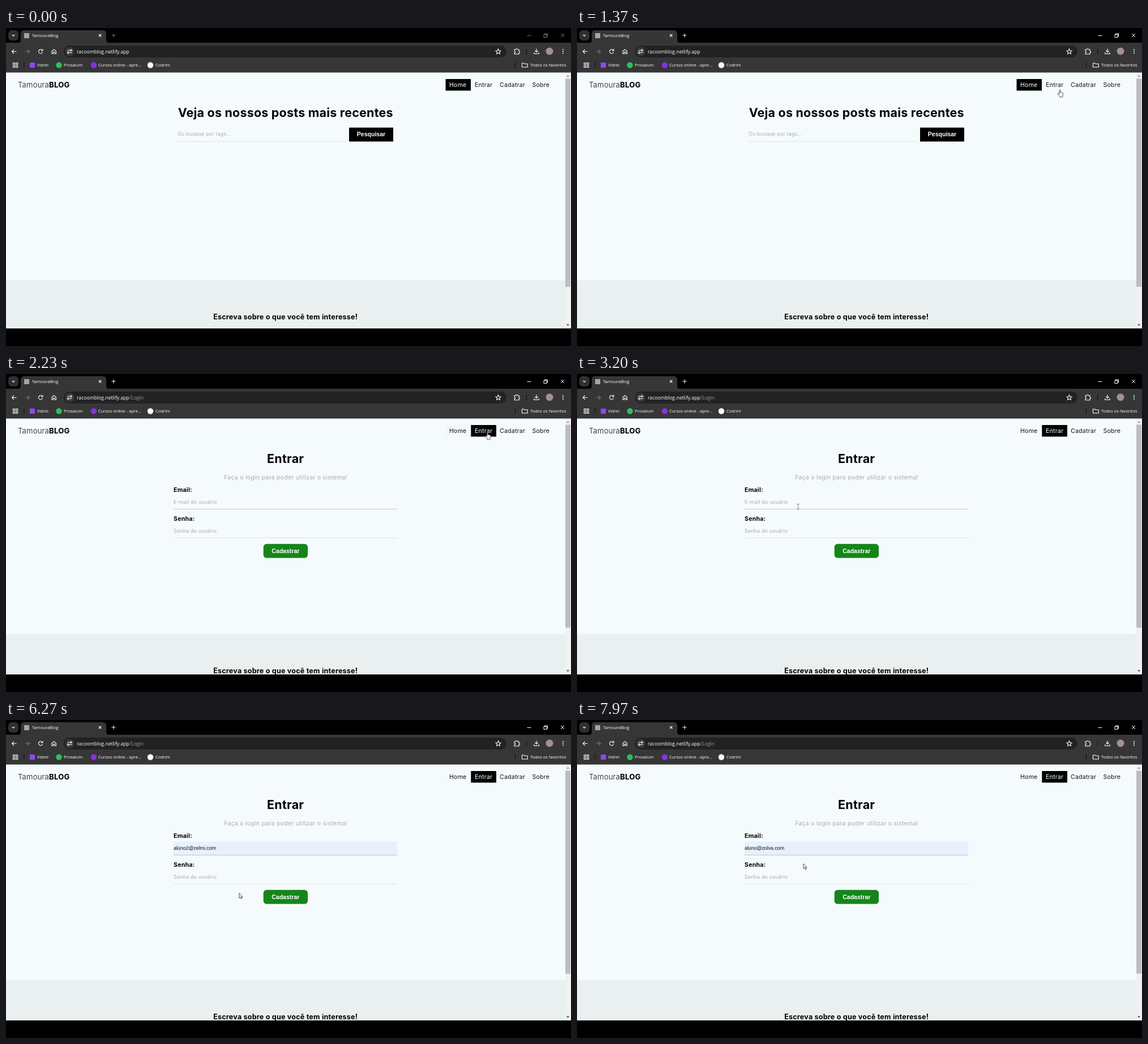
An HTML page for the animation above (8 s loop, 998 px wide and 561 px high).

```html
<!DOCTYPE html>
<html lang="pt-BR">
<head>
<meta charset="utf-8">
<title>TamouraBlog</title>
<style>
html, body { margin: 0; width: 100%; height: 100%; overflow: hidden; background: #000; }
svg { display: block; width: 998px; height: 561px; }

.ui { font: 7.5px "Open Sans", "Noto Sans", sans-serif; fill: #fff; }
.url { font-size: 8.64px; }
.path { fill: #9b9b9b; }
.site { font: 400 10.56px Inter, sans-serif; letter-spacing: .022em; }
.site text { fill: #111; }
.site .title { font-size: 21.45px; font-weight: 700; fill: #000; }
.site .bold { font-weight: 700; fill: #000; }
.site .logo { font-size: 13.1px; }
.site .light { font-weight: 300; }
.site .black { font-weight: 800; }
.site .call { font-size: 12.5px; }
.site .soft { fill: #a9abac; }
.site .hint { font-size: 8.8px; fill: #a9abac; }
.site .button { font: 700 10.56px "Liberation Sans", Arial, sans-serif; letter-spacing: 0; fill: #fff; }
.site .typed { font: 8.8px "Liberation Sans", Arial, sans-serif; letter-spacing: 0; }
.mid { text-anchor: middle; }
.line { fill: none; stroke: #fff; stroke-width: 1.1; }
.dim { stroke: #777; }

/* Every animation shares one 8 s clock; 1% is 80 ms. */
.anim, .step { animation: 8s linear infinite; }
.step { animation-timing-function: step-end; }

#controls { animation-name: focus; }
@keyframes focus { 0% { stroke: #777 } 7.5%, 100% { stroke: #fff } }

.before { animation-name: before; }
.after { animation-name: after; }
@keyframes before { 0% { opacity: 1 } 23.375%, 100% { opacity: 0 } }
@keyframes after { 0% { opacity: 0 } 23.375%, 100% { opacity: 1 } }

#footer { animation-name: footer; }
@keyframes footer { 0% { transform: none } 23.375%, 100% { transform: translateY(14px) } }
#thumb { animation-name: thumb; }
@keyframes thumb { 0% { height: 367px } 23.375%, 100% { height: 358px } }

#homeBox { animation-name: boxOff; }
#enterBox { animation-name: boxOn; }
#homeText { animation-name: textOff; }
#enterText { animation-name: textOn; }
@keyframes boxOff {
  0% { opacity: 1 }
  23.5% { opacity: 1; animation-timing-function: ease }
  28.5%, 100% { opacity: 0 }
}
@keyframes boxOn {
  0% { opacity: 0 }
  23.5% { opacity: 0; animation-timing-function: ease }
  28.5%, 100% { opacity: 1 }
}
@keyframes textOff {
  0% { fill: #fff }
  23.5% { fill: #fff; animation-timing-function: ease }
  28.5%, 100% { fill: #111 }
}
@keyframes textOn {
  0% { fill: #111 }
  23.5% { fill: #111; animation-timing-function: ease }
  26%, 100% { fill: #fff }
}

#caret { animation-name: caret; }
@keyframes caret { 0%, 51.25%, 58.75%, 100% { opacity: 0 } 44.625%, 57.875% { opacity: 1 } }
#filled { animation-name: filled; }
@keyframes filled { 0% { opacity: 0 } 58.75%, 100% { opacity: 1 } }
#mailA { animation-name: mailA; }
#mailB { animation-name: mailB; }
@keyframes mailA { 0%, 81.25%, 92.5%, 100% { opacity: 1 } 71.5%, 84.5% { opacity: 0 } }
@keyframes mailB { 0%, 81.25%, 92.5%, 100% { opacity: 0 } 71.5%, 84.5% { opacity: 1 } }

#pointer { animation-name: move; }
@keyframes move {
  0%, 3.125% { transform: translate(770px, 538px) }
  8.75% { transform: translate(820px, 300px) }
  13.75% { transform: translate(850px, 120px) }
  17.125% { transform: translate(853px, 109px) }
  21.25% { transform: translate(852px, 104px) }
  23.75%, 31.625% { transform: translate(850.5px, 102.5px) }
  33.5% { transform: translate(640px, 170px) }
  35.375%, 37.125% { transform: translate(403px, 233px) }
  40%, 48.375% { transform: translate(390.5px, 234px) }
  58.125% { transform: translate(402px, 250px) }
  58.75% { transform: translate(403px, 254px) }
  68.375%, 70% { transform: translate(405px, 262px) }
  72.5% { transform: translate(409px, 300px) }
  75%, 77.5% { transform: translate(412px, 309px) }
  78.375% { transform: translate(412px, 305.5px) }
  81.25% { transform: translate(409px, 268px) }
  85.625% { transform: translate(404px, 312px) }
  88.375%, 91.25% { transform: translate(400px, 317px) }
  95% { transform: translate(400px, 262px) }
  97.875%, 100% { transform: translate(400px, 253.5px) }
}
#arrow { animation-name: arrow; }
#hand { animation-name: hand; }
#beam { animation-name: beam; }
@keyframes arrow { 0%, 32%, 50.625%, 100% { opacity: 1 } 16.25%, 34.875% { opacity: 0 } }
@keyframes hand { 0%, 32%, 100% { opacity: 0 } 16.25% { opacity: 1 } }
@keyframes beam { 0%, 50.625%, 100% { opacity: 0 } 34.875% { opacity: 1 } }
</style>
</head>
<body>
<svg viewBox="0 0 998 561">
  <defs><clipPath id="window"><rect width="998" height="530"/></clipPath></defs>
  <rect width="998" height="561"/>

  <!-- Browser frame -->
  <g class="ui">
    <rect y="26" width="998" height="52.5" fill="#363636"/>
    <rect x="4" y="4" width="18" height="18" rx="6" fill="#303030"/>
    <path d="M22 26q4 0 4-5V10q0-6 6-6h139q6 0 6 6v11q0 5 4 5z" fill="#363636"/>
    <rect x="32" y="9" width="9" height="9" fill="#a5a5a5"/>
    <text x="46" y="16">TamouraBlog</text>
    <path class="line" d="M10.8 12l2.2 2.2 2.2-2.2M164 11l4.4 4.4m0-4.4l-4.4 4.4"/>
    <g id="controls" class="step" fill="none">
      <path d="M186.5 13h7m-3.5-3.5v7M920.5 13.5h7M980 10l6 6m0-6l-6 6"/>
      <path d="M950 11.5h5v5h-5zM951.5 11.5V10h5v5H955"/>
    </g>

    <rect x="102" y="31" width="782" height="21" rx="10.5" fill="#212224"/>
    <circle cx="112.5" cy="41.5" r="8" fill="#3a3a3a"/>
    <path class="line dim" d="M33.5 41.5h8m-3.5-3.5l3.5 3.5-3.5 3.5"/>
    <g class="line">
      <path d="M18.5 41.5h-8m3.5-3.5l-3.5 3.5 3.5 3.5"/>
      <path d="M64.3 39.5a3.6 3.6 0 1 0 .3 3M64.8 37v3h-3"/>
      <path d="M81 41l3.7-3.3 3.7 3.3v4.5h-2.4v-3h-2.6v3H81z"/>
      <path d="M108.5 39.5h4m0 4h4"/>
      <circle cx="114.8" cy="39.5" r="1.4"/><circle cx="110" cy="43.5" r="1.4"/>
      <path d="M869.5 37l1.3 3 3.2.3-2.4 2.1.7 3.2-2.8-1.7-2.8 1.7.7-3.2-2.4-2.1 3.2-.3z"/>
      <path d="M898 38h2.5a1.5 1.5 0 0 1 3 0h2.5v2.7a1.5 1.5 0 0 1 0 3V46h-8v-2.3a1.5 1.5 0 0 0 0-3z"/>
      <path d="M937 36.5v6m-2.7-2.6l2.7 2.7 2.7-2.7M932.8 43v2.5h8.4V43"/>
    </g>
    <path d="M919.5 37v9M899.5 60.5v9M32 60.5v9" stroke="#0c0c0c"/>
    <circle cx="960" cy="41" r="6.5" fill="#a38f98"/>
    <circle cx="984" cy="38" r="1"/><circle cx="984" cy="41.3" r="1"/><circle cx="984" cy="44.6" r="1"/>
    <text class="url" x="125" y="44.7">racoomblog.netlify.app</text>
    <text class="url path after step" x="218" y="44.7">/Login</text>

    <path class="line" d="M12.5 61.5h3v3h-3zM17.7 61.5h3v3h-3zM12.5 66.5h3v3h-3zM17.7 66.5h3v3h-3z"/>
    <rect x="42" y="61" width="9" height="9" fill="#9146ff"/>
    <text x="55" y="68">Vidrel</text>
    <circle cx="93.5" cy="65.5" r="5.2" fill="#2bc254"/>
    <text x="102" y="68">Prosalum</text>
    <circle cx="155" cy="65.5" r="5.2" fill="#8b2fe0"/>
    <text x="163" y="68">Cursos online - apre...</text>
    <circle cx="255" cy="65.5" r="5.2"/>
    <text x="264" y="68">Codrim</text>
    <path class="line" d="M911.5 62h3.5l1.2 1.3h5v5.7h-9.7z"/>
    <text x="926" y="68">Todos os favoritos</text>
  </g>

  <!-- Page -->
  <g class="site" clip-path="url(#window)">
    <rect y="78.5" width="988" height="451.5" fill="#f5fbfc"/>
    <text class="logo light" x="21" y="105">Tamoura<tspan class="black">BLOG</tspan></text>
    <rect id="homeBox" class="anim" x="776.5" y="90" width="44.5" height="20.5"/>
    <rect id="enterBox" class="anim" x="821.3" y="90" width="44.7" height="20.5"/>
    <text id="homeText" class="anim" x="783" y="104">Home</text>
    <text id="enterText" class="anim" x="828" y="104">Entrar</text>
    <text x="872" y="104">Cadatrar</text>
    <text x="929.5" y="104">Sobre</text>

    <g class="before step">
      <text class="title mid" x="493.7" y="156.5">Veja os nossos posts mais recentes</text>
      <text class="hint" x="303" y="190.3">Ou busque por tags...</text>
      <path d="M303 200h297" stroke="#e4dcea"/>
      <rect x="606" y="175.7" width="78" height="24.6"/>
      <text class="button mid" x="645" y="191.3">Pesquisar</text>
    </g>

    <g class="after step">
      <text class="title mid" x="493.7" y="156.5">Entrar</text>
      <text class="soft mid" x="494" y="185.5">Faça o login para poder utilizar o sistema!</text>
      <text class="bold" x="296" y="208.3">Email:</text>
      <text class="hint" x="296" y="228.7">E-mail do usuário</text>
      <rect id="caret" class="step" x="296" y="220.5" width=".8" height="11"/>
      <g id="filled" class="step">
        <rect x="296" y="214.5" width="395" height="24" fill="#e8f0fe"/>
        <text id="mailA" class="typed step" x="296" y="228.5">aluno@zolva.com</text>
        <text id="mailB" class="typed step" x="296" y="228.5">aluno2@zelmi.com</text>
      </g>
      <path d="M296 238.3h395" stroke="#c6c2cc"/>
      <text class="bold" x="296" y="259">Senha:</text>
      <text class="hint" x="296" y="279.6">Senha do usuário</text>
      <path d="M296 289.3h395" stroke="#dbe4dc"/>
      <rect x="454.7" y="299.8" width="78.3" height="24.8" rx="5.5" fill="#15851a"/>
      <text class="button mid" x="493.8" y="315.5">Cadastrar</text>
    </g>

    <g id="footer" class="step">
      <rect y="445" width="988" height="100" fill="#eaf0f0"/>
      <text class="call bold mid" x="493.7" y="513.7">Escreva sobre o que você tem interesse!</text>
    </g>

    <rect x="988" y="78.5" width="10" height="451.5" fill="#f1f1f1"/>
    <rect id="thumb" class="step" x="988" y="89.5" width="9" height="367" fill="#bdbdbd"/>
    <path d="M990 86l2.5-3 2.5 3z" fill="#999"/>
    <path d="M990 522.5l2.5 3 2.5-3z" fill="#444"/>
  </g>

  <!-- Mouse pointer, hot spot at its origin -->
  <g clip-path="url(#window)">
    <g id="pointer" class="anim" fill="#fff" stroke="#222" stroke-width=".8" stroke-linejoin="round">
      <path id="arrow" class="step" d="M0 0v9l2.1-2 1.5 3.3 1.3-.6-1.5-3.2h2.8z"/>
      <path id="hand" class="step" d="M-.9.6q.9-1.2 1.8 0V4.4l3.600.9q1.3.4 1.1 1.9l-.8 3.3v2.3h-5.3v-1.6L-3.9 7.5q-.3-1.5 1.2-1.3l1.8 1.5z"/>
      <path id="beam" class="step" d="M-2-4.500h1.5L0-4l.5-.5H2M0-4v8M-2 4.5h1.5L0 4l.5.5H2" fill="none" stroke="#555"/>
    </g>
  </g>
</svg>
</body>
</html>
```
